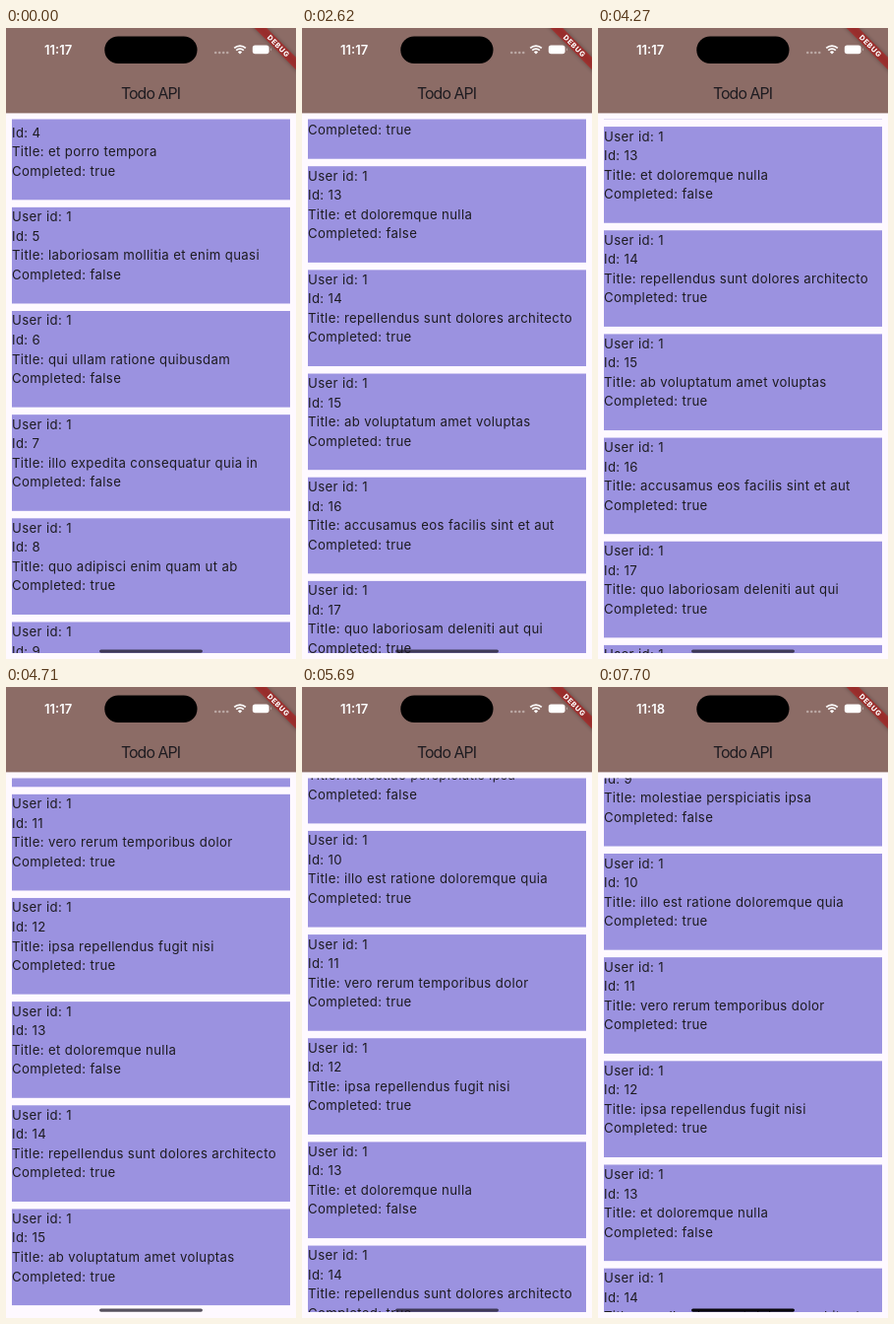
An HTML page that plays this animation: 295 by 640 pixels, repeating every 8000 ms.

```html
<!DOCTYPE html>
<html lang="en">
<head>
<meta charset="utf-8">
<title>Todo list</title>
<style>
  html, body { margin: 0; width: 100%; height: 100%; overflow: hidden; background: #fef9ff; }
  svg { display: block; font-family: Inter, sans-serif; }
  #list { font-size: 13.2px; letter-spacing: .36px; fill: #1d1b20; }
  #list rect { fill: #9b92e0; }
</style>
</head>
<body>
<svg width="295" height="640" viewBox="0 0 295 640">
  <clipPath id="view"><rect x="6" y="92.4" width="283" height="541.6"/></clipPath>
  <g clip-path="url(#view)"><g id="list"></g></g>

  <rect width="295" height="86.4" fill="#8c6c66"/>
  <text x="147" y="71.7" text-anchor="middle" font-size="15.8" letter-spacing="-.9" fill="#1d1b20">Todo API</text>
  <text id="clock" x="39" y="26.7" font-size="13" font-weight="600" fill="#fff"></text>
  <rect x="100.3" y="8.5" width="94.2" height="27.6" rx="13.8"/>
  <g fill="#fff">
    <g opacity=".4">
      <circle cx="213.2" cy="25" r="1.3"/><circle cx="217.2" cy="25" r="1.3"/>
      <circle cx="221.2" cy="25" r="1.3"/><circle cx="225.2" cy="25" r="1.3"/>
    </g>
    <path d="M238 26.6l-2.1-2.2a3 3 0 0 1 4.2 0z"/>
    <rect x="250.8" y="17.4" width="16.8" height="8.8" rx="2.6"/>
    <path d="M269 20.2a1.7 1.7 0 0 1 0 3z" opacity=".5"/>
  </g>
  <path d="M232.2 20.4a8.3 8.3 0 0 1 11.6 0M234.2 22.7a5.4 5.4 0 0 1 7.6 0"
    fill="none" stroke="#fff" stroke-width="1.7"/>
  <g transform="translate(295 0) rotate(45)">
    <rect x="-45" y="21" width="90" height="9" fill="#b71c1c" fill-opacity=".63"
      style="filter:drop-shadow(0 0 2px rgba(0,0,0,.5))"/>
    <text x=".4" y="28.1" text-anchor="middle" fill="#fff" font-size="7.2" font-weight="800"
      letter-spacing=".8">DEBUG</text>
  </g>
  <rect id="home" x="95" y="630.4" width="105" height="3.4" rx="1.7"/>
</svg>
<script>
const LOOP = 8000, FIRST_ID = 3;
const TOP = 92.4, PITCH = 105.16, CARD_HEIGHT = 97.65, LINE = 19.53, BASELINE = 14.5;
// A leading "+" marks a completed todo, "|" a line break.
const todos = [
  'fugiat veniam minus', '+et porro tempora', 'laboriosam mollitia et enim quasi',
  'qui ullam ratione quibusdam', 'illo expedita consequatur quia in', '+quo adipisci enim quam ut ab',
  'molestiae perspiciatis ipsa', '+illo est ratione doloremque quia', '+vero rerum temporibus dolor',
  '+ipsa repellendus fugit nisi', 'et doloremque nulla', '+repellendus sunt dolores architecto',
  '+ab voluptatum amet voluptas', '+accusamus eos facilis sint et aut', '+quo laboriosam deleniti aut qui',
  'dolorum est consequatur ea mollitia', '+molestiae ipsa aut voluptatibus',
  '+ullam nobis libero sapiente ad optio', 'suscipit repellat esse quibusdam|voluptatem incidunt',
  '+distinctio vitae autem nihil ut|molestias quo'
];
const byId = id => document.getElementById(id);
const list = byId('list'), clock = byId('clock'), home = byId('home');

list.innerHTML = todos.map((todo, i) => {
  const id = FIRST_ID + i, y = TOP + (id - 1) * PITCH;
  const titleLines = `Title: ${todo.replace('+', '')}`.split('|');
  const lines = [`User id: ${id > 20 ? 2 : 1}`, `Id: ${id}`, ...titleLines, `Completed: ${todo[0] === '+'}`];
  return `<rect x="6" y="${y}" width="283" height="${CARD_HEIGHT}"/>` +
    lines.map((line, n) => `<text x="6" y="${y + BASELINE + n * LINE}">${line}</text>`).join('');
}).join('');

// Screen updates: [start ms, equal updates until the next entry]
const updates = [[0, 1], [500, 2], [720, 1], [1080, 1], [2310, 3], [2620, 8], [3490, 7],
  [4270, 9], [5250, 9], [6210, 6], [6870, 1], [7700, 1], [LOOP, 1]];

function updateTime(t) {
  const i = updates.findIndex(([start]) => start > t) - 1;
  const [start, count] = updates[i], step = (updates[i + 1][0] - start) / count;
  return start + Math.floor((t - start) / step + 1e-6) * step;
}

const decay = (t, tau) => Math.exp(-t / tau);

function scrollAt(t) {
  if (t < 500) return 331.2;
  if (t < 2310) return 760 - 430 * decay(t - 390, 130);
  const flingDown = 1661.1 - 447 * decay(t - 2620, 500);
  const flingBack = 869.5 + 57.8 * decay(t - 5250, t < 5250 ? 517 : 472);
  return Math.min(flingDown, flingBack);
}

function draw(now) {
  const t = updateTime(now % LOOP), late = t >= 5780;
  list.setAttribute('transform', `translate(0 ${-scrollAt(t).toFixed(2)})`);
  clock.textContent = late ? '11:18' : '11:17';
  home.setAttribute('fill', late ? '#08060c' : 'rgba(30,25,40,.74)');
}

const begin = performance.now();
function tick() {
  draw(performance.now() - begin);
  requestAnimationFrame(tick);
}
tick();
</script>
</body>
</html>
```
